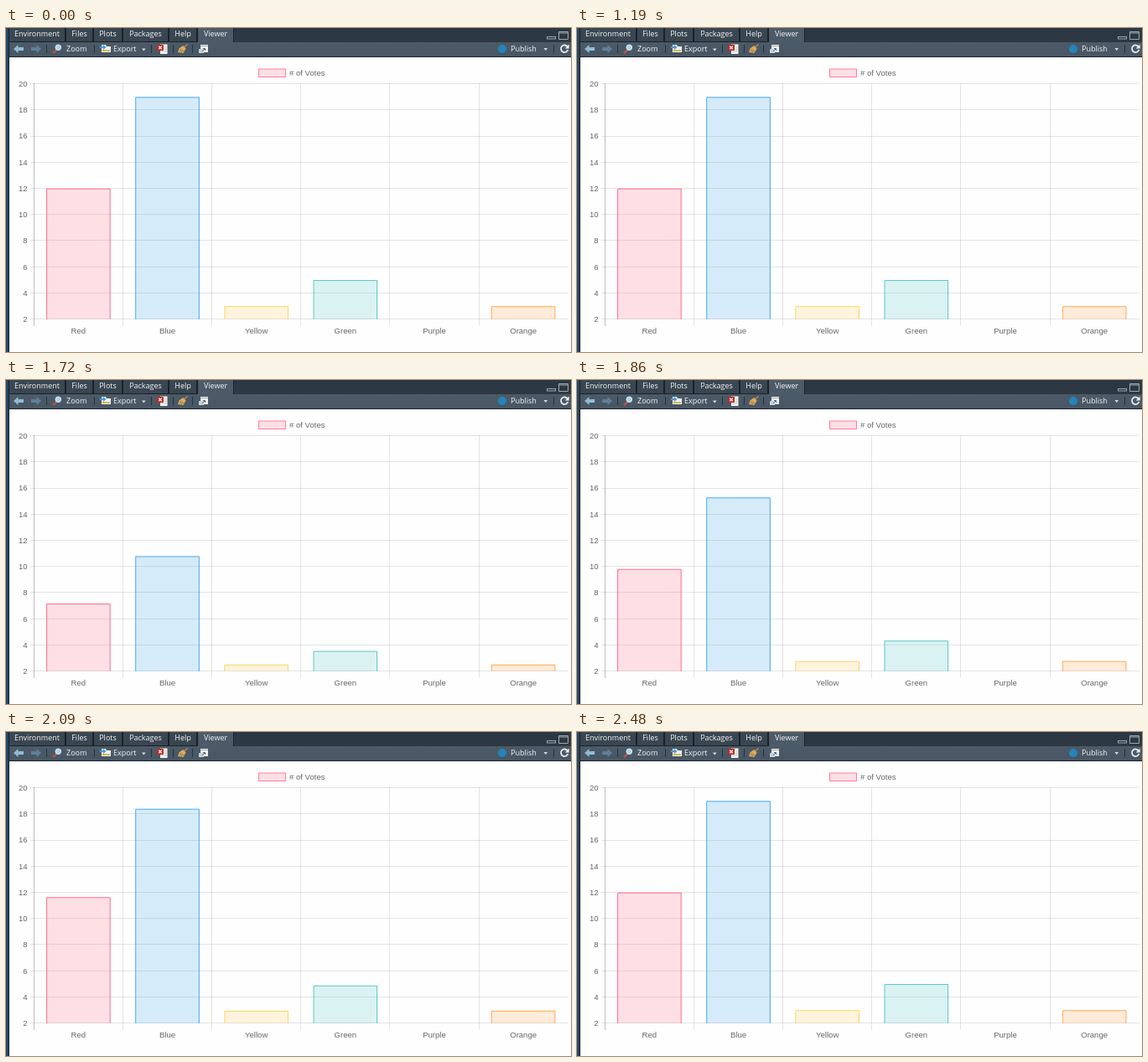
An HTML page that plays this animation: 674x387 px, repeating every 4850 ms.

```html
<!DOCTYPE html>
<html lang="en">
<head>
<meta charset="utf-8">
<title>Votes chart</title>
<style>
  html, body { margin: 0; width: 100%; height: 100%; overflow: hidden; background: #fefefe; }
  svg { display: block; width: 674px; height: 387px; }
  .ui { font: 9px "Open Sans", "Noto Sans", sans-serif; fill: #f4f6f8; }
  .chart { font: 9.56px "Liberation Sans", Arial, sans-serif; fill: #666; }
</style>
</head>
<body>
<svg id="stage" viewBox="0 0 674 387">
  <defs>
    <linearGradient id="bar" x1="0" y1="0" x2="0" y2="1">
      <stop offset="0" stop-color="#4d5b68"/>
      <stop offset="1" stop-color="#485663"/>
    </linearGradient>
  </defs>
  <rect width="674" height="387" fill="#fefefe"/>
  <rect width="674" height="17" fill="#2d3843"/>
  <g id="tabs" class="ui"></g>
  <rect x="4" y="17" width="670" height="17" fill="url(#bar)"/>
  <rect x="4" y="34" width="670" height="1" fill="#17222d"/>
  <rect width="3" height="387" fill="#294663"/>
  <rect x="3" width="1" height="387" fill="#14212e"/>

  <g id="tools" class="ui">
    <path d="M9 25l5.5-5v3H21v4h-6.500v3z" fill="#91bbd6"/>
    <path d="M42 25l-5.500-5v3H30v4h6.500v3z" fill="#5f8099"/>
    <path d="M60 26l-4 4" stroke="#c9533d" stroke-width="2"/>
    <circle cx="62.300" cy="23.300" r="3.300" fill="#a9d7ee" stroke="#e5eef3"/>
    <path d="M114 20h5l1 2h5v7h-11z" fill="#eef1f2"/>
    <path d="M115 26h9v2h-9z" fill="#d6b64f"/>
    <path d="M112 22h4v-2l3.500 3-3.500 3v-2h-4z" fill="#4a9bd1"/>
    <path d="M162 24.500h4.600l-2.300 3z" fill="#d5dbe0"/>
    <path d="M184 19.500h8.500V31H184z" fill="#f1f2f2"/>
    <path d="M186 28h5M189 23h2.500M189 25.500h2.500" stroke="#b2b8bd" stroke-width=".8"/>
    <rect x="180" y="20" width="8" height="7" rx="1" fill="#c8221c"/>
    <path d="M182.200 21.700l3.600 3.600m0-3.600l-3.600 3.600" stroke="#fff" stroke-width="1.300"/>
    <path d="M216.500 19.500l-4.500 4" stroke="#bd8748" stroke-width="1.600"/>
    <path d="M211 21l3.500 3.500-3 5.500-6.500-1 1.500-4.500z" fill="#d9ad62"/>
    <path d="M208 25l4 3m-5-1.500l3 2.500" stroke="#8e6432" stroke-width=".8"/>
    <path d="M232 20h9v9h-9z" fill="#eef0f1"/>
    <path d="M232 21.500h9" stroke="#a3afb8"/>
    <path d="M230 25h6v5h-6z" fill="#c8d0d6"/>
    <path d="M234 28l3.500-3.500m-2.500 0h2.500V27" fill="none" stroke="#526878"/>
    <circle cx="592" cy="25" r="5" fill="#2484bd"/>
    <path d="M641.500 24h4.600l-2.300 3z" fill="#d5dbe0"/>
    <path d="M669.800 22.300A4.300 4.300 0 1 0 670.400 26" fill="none" stroke="#e9edf0" stroke-width="1.800"/>
    <path d="M671.700 19.500v5h-5z" fill="#e9edf0"/>
  </g>
  <g fill="none" stroke="#9ba8b3">
    <rect x="645.500" y="10.500" width="10" height="2.500"/>
    <path d="M659.500 4.500h11v9h-11zM659.500 6h11"/>
  </g>

  <g id="grid" stroke="#000" stroke-opacity=".1"></g>
  <g id="labels" class="chart"></g>
  <rect x="301.500" y="49" width="32" height="9.500" fill="rgba(255,99,132,.2)" stroke="rgb(255,99,132)" stroke-width=".8"/>
  <g id="bars"></g>
</svg>
<script>
const LOOP = 4850, BASE = 348, UNIT = 15.62, LEFT = 33.3, SLOT = 106.15;
const $ = id => document.getElementById(id);

function add(parent, tag, attrs, text) {
  const node = document.createElementNS(parent.namespaceURI, tag);
  for (const key in attrs) node.setAttribute(key, attrs[key]);
  if (text !== undefined) node.textContent = text;
  parent.appendChild(node);
  return node;
}
const label = (parent, x, y, text, anchor = "start") =>
  add(parent, "text", { x, y, "text-anchor": anchor }, text);

// Tabs: label, left edge, width
[["Environment", 4, 66], ["Files", 72, 31], ["Plots", 105, 33],
 ["Packages", 140, 53], ["Help", 195, 32], ["Viewer", 229, 42]].forEach(([name, x, w]) => {
  const active = name === "Viewer";
  add($("tabs"), "rect", { x: x - 1, y: 0, width: w + 2, height: 17, fill: "#18222c" });
  add($("tabs"), "path", {
    d: `M${x} ${active ? 17 : 16}V0h${w}V${active ? 17 : 16}z`,
    fill: active ? "#4d5b68" : "#3a4650"
  });
  label($("tabs"), x + w / 2, 10, name, "middle");
});

label($("tools"), 72, 28, "Zoom");
label($("tools"), 128, 28, "Export");
label($("tools"), 602, 28, "Publish");
[48, 105, 173, 199, 222, 653].forEach(x =>
  add($("tools"), "path", { d: `M${x}.5 20v10`, stroke: "#26323d" }));

// Axes
for (let v = 2; v <= 20; v += 2) {
  const y = BASE - (v - 2) * UNIT;
  add($("grid"), "path", { d: `M29 ${Math.floor(y - .3) + .5}H671` });
  label($("labels"), 25.5, y + 3, v, "end");
}
label($("labels"), 338, 57, "# of Votes");

const series = [
  ["Red", 12, "255,99,132"], ["Blue", 19, "54,162,235"], ["Yellow", 3, "255,206,86"],
  ["Green", 5, "75,192,192"], ["Purple", 2, "153,102,255"], ["Orange", 3, "255,159,64"]
];
const bars = series.map(([name, value, rgb], i) => {
  const x = LEFT + i * SLOT, mid = x + SLOT / 2;
  add($("grid"), "path", {
    d: `M${Math.floor(x) + .5} 66V356`, "stroke-opacity": i ? .1 : .25
  });
  label($("labels"), mid, 365, name, "middle");
  const path = add($("bars"), "path", {
    fill: `rgba(${rgb},.2)`, stroke: `rgb(${rgb})`, "stroke-width": .9
  });
  return { path, value, x: mid - SLOT * .36 + .4, w: SLOT * .72 - .8 };
});

// Moments at which the growing bars are redrawn
const ticks = [1580, 1630, 1680, 1720, 1770, 1820, 1860, 1920, 1980, 2040, 2090,
  2150, 2200, 2260, 2310, 2370, 2420, 2480];

function growth(t) {
  if (t < ticks[0] || t >= ticks[ticks.length - 1]) return 1;
  const at = ticks.filter(k => k <= t).pop();
  const p = Math.min(1, Math.floor(2 + (at - ticks[0]) * .063) / 60);
  return 1 - (1 - p) ** 4;
}

function render(t) {
  const g = growth(t);
  for (const { path, value, x, w } of bars) {
    const h = (value - 2) * UNIT * g;
    path.setAttribute("d", h ? `M${x} ${BASE}V${BASE - h + .4}h${w}V${BASE}` : "");
  }
}

const start = performance.now();
function frame() {
  render((performance.now() - start) % LOOP);
  requestAnimationFrame(frame);
}
render(0);
requestAnimationFrame(frame);
</script>
</body>
</html>
```
